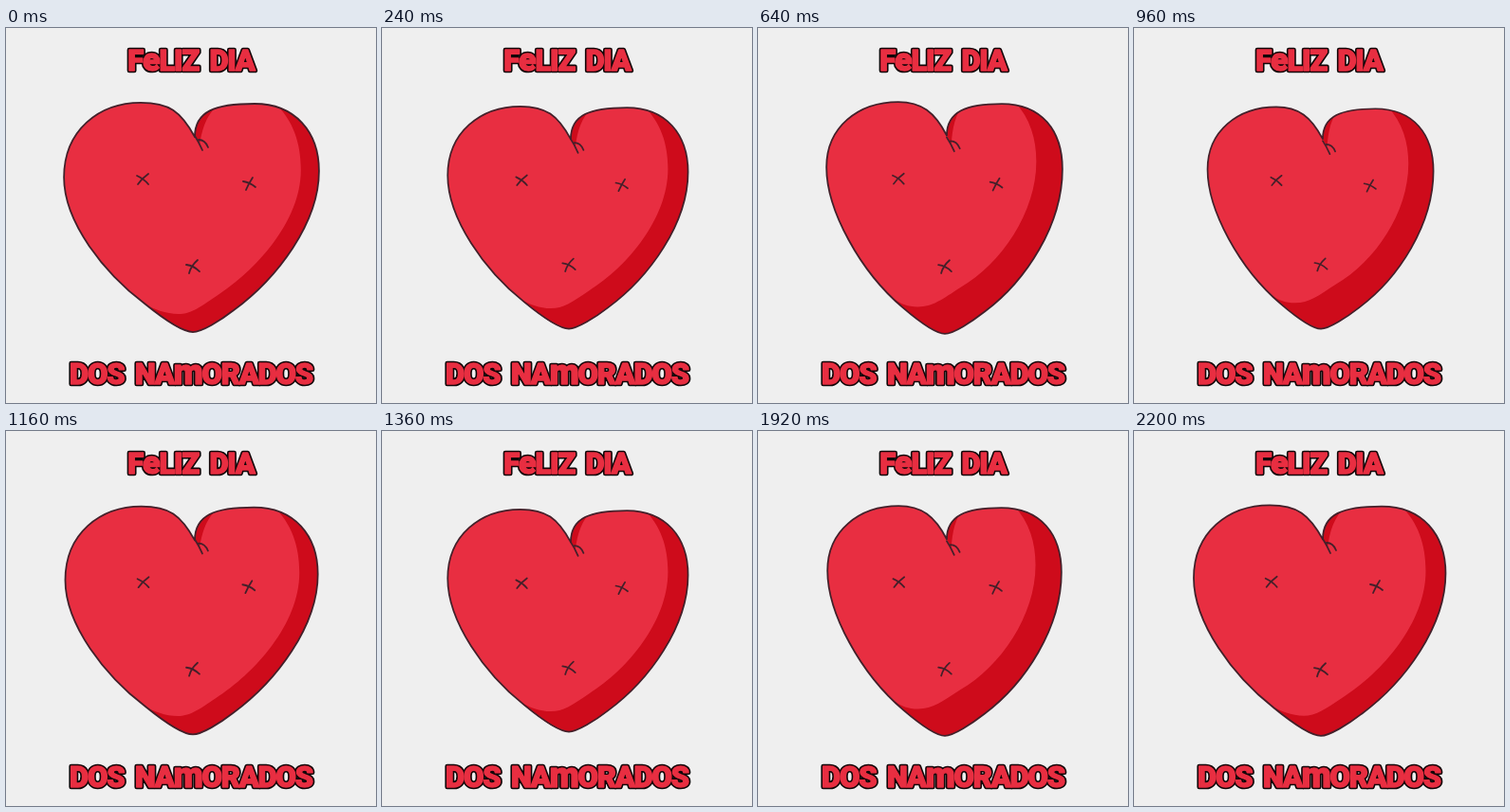
Animation of 390 by 396 pixels, one loop 2240 ms. Source, as an HTML page:

```html
<!DOCTYPE html>
<html lang="pt">
<head>
<meta charset="utf-8">
<title>Feliz dia dos namorados</title>
<style>
html, body { margin: 0; width: 100%; height: 100%; overflow: hidden; background: #efefef; }
svg { display: block; width: 390px; height: 396px; }

text { font: 900 31px Roboto, "Open Sans", sans-serif; letter-spacing: -1.2px; word-spacing: 5px; text-anchor: middle; }
.e { font-size: 34px; }
.m { font-size: 36px; }
.edge { fill: #120608; stroke: #120608; stroke-width: 4.6; stroke-linejoin: round; }
.face { fill: #e82e41; stroke: #e82e41; stroke-width: 1.4; stroke-linejoin: round; }

.light { fill: #e82e41; }
.dark { fill: #ce0b1b; }
.line { fill: none; stroke: #43202a; stroke-width: 1.8; stroke-linecap: round; stroke-linejoin: round; }

.beat { transform-origin: 197.5px 200.5px; animation: beat 1120ms -8ms infinite; }
.heart, .shade, .fold { animation: morph 1120ms -8ms infinite; }
.stitch { animation: drift 1120ms -8ms infinite; }

/* Wide and narrow pose of each shape */
.heart {
  --wide: path("M197 321 C184 321 162 304 146 291 C104 259 61 206 61 158 C61 108 98 79 142 79 C172 79 184 88 199 115 C199 88 220 80 262 80 C305 80 330 110 330 151 C330 206 286 264 240 298 C226 309 206 321 197 321 Z");
  --narrow: path("M197 325 C187 325 166 309 152 297 C106 258 70 192 70 146 C70 103 104 76 147 76 C172 76 186 87 199 112 C199 86 220 78 258 78 C301 78 323 107 323 148 C323 208 284 268 240 301 C226 312 206 325 197 325 Z");
}
.shade {
  --wide: path("M280 76 C302 95 311 120 311 150 C311 205 262 257 222 283 C203 296 194 302 182 302 C169 302 155 297 146 291 L146 345 L345 345 L345 76 Z");
  --narrow: path("M270 74 C288 92 295 115 295 140 C295 195 257 250 214 275 C194 288 184 296 168 296 C157 296 150 293 143 288 L143 345 L345 345 L345 74 Z");
}
.fold {
  --wide: path("M199 115 L197 78 L228 78 C211 90 207 106 204 124 Z");
  --narrow: path("M199 112 L197 76 L218 76 C208 90 205 104 204 121 Z");
}

/* Heart size: slow release, then two quick swells */
@keyframes beat {
  0% { scale: 1; animation-timing-function: steps(6); }
  21.4286% { scale: .961; animation-timing-function: steps(8); }
  50% { scale: .92; animation-timing-function: steps(2); }
  57.1429% { scale: .983; animation-timing-function: steps(1); }
  60.7143% { scale: 1; animation-timing-function: steps(7); }
  85.7143% { scale: .941; animation-timing-function: steps(1); }
  89.2857% { scale: .932; animation-timing-function: steps(2); }
  96.4286%, 100% { scale: 1; }
}
/* Wide pose to narrow pose and back */
@keyframes morph {
  0% { d: var(--wide); animation-timing-function: linear(0, .32 43%, 1); }
  50% { d: var(--narrow); }
  85.7143% { d: var(--narrow); animation-timing-function: linear(0 0% 25%, .26 25% 50%, .54 50% 75%, .78 75% 100%); }
  100% { d: var(--wide); }
}
@keyframes drift {
  0% { translate: 0 0; animation-timing-function: linear(0, .32 43%, 1); }
  50% { translate: var(--by); }
  85.7143% { translate: var(--by); animation-timing-function: linear(0 0% 25%, .26 25% 50%, .54 50% 75%, .78 75% 100%); }
  100% { translate: 0 0; }
}
</style>
</head>
<body>
<svg viewBox="0 0 390 396">
  <defs>
    <clipPath id="inside"><path class="heart"/></clipPath>
    <g id="words">
      <text x="195" y="44.8">F<tspan class="e">e</tspan>LIZ DIA</text>
      <text x="195" y="375.6">DOS NA<tspan class="m">m</tspan>ORADOS</text>
    </g>
  </defs>

  <use href="#words" class="edge"/>
  <use href="#words" class="face"/>

  <g class="beat">
    <g clip-path="url(#inside)">
      <rect class="light" width="390" height="396"/>
      <path class="dark shade"/>
      <path class="dark fold"/>
    </g>
    <g class="line">
      <path class="heart"/>
      <path d="M199 114 Q203 120 207 129 M203 118 C207 118 211 121 213 126"/>
      <path class="stitch" style="--by: 3px -1px" d="M138 156 Q145 159 150 165 M150 154 Q143 159 139 165"/>
      <path class="stitch" style="--by: -4.5px 0px" d="M250 162 Q257 163 263 168 M260 158 Q256 164 253 171"/>
      <path class="stitch" style="--by: 0px 1px" d="M190 250 Q198 251 204 257 M202 245 Q195 251 193 259"/>
    </g>
  </g>
</svg>
</body>
</html>
```
